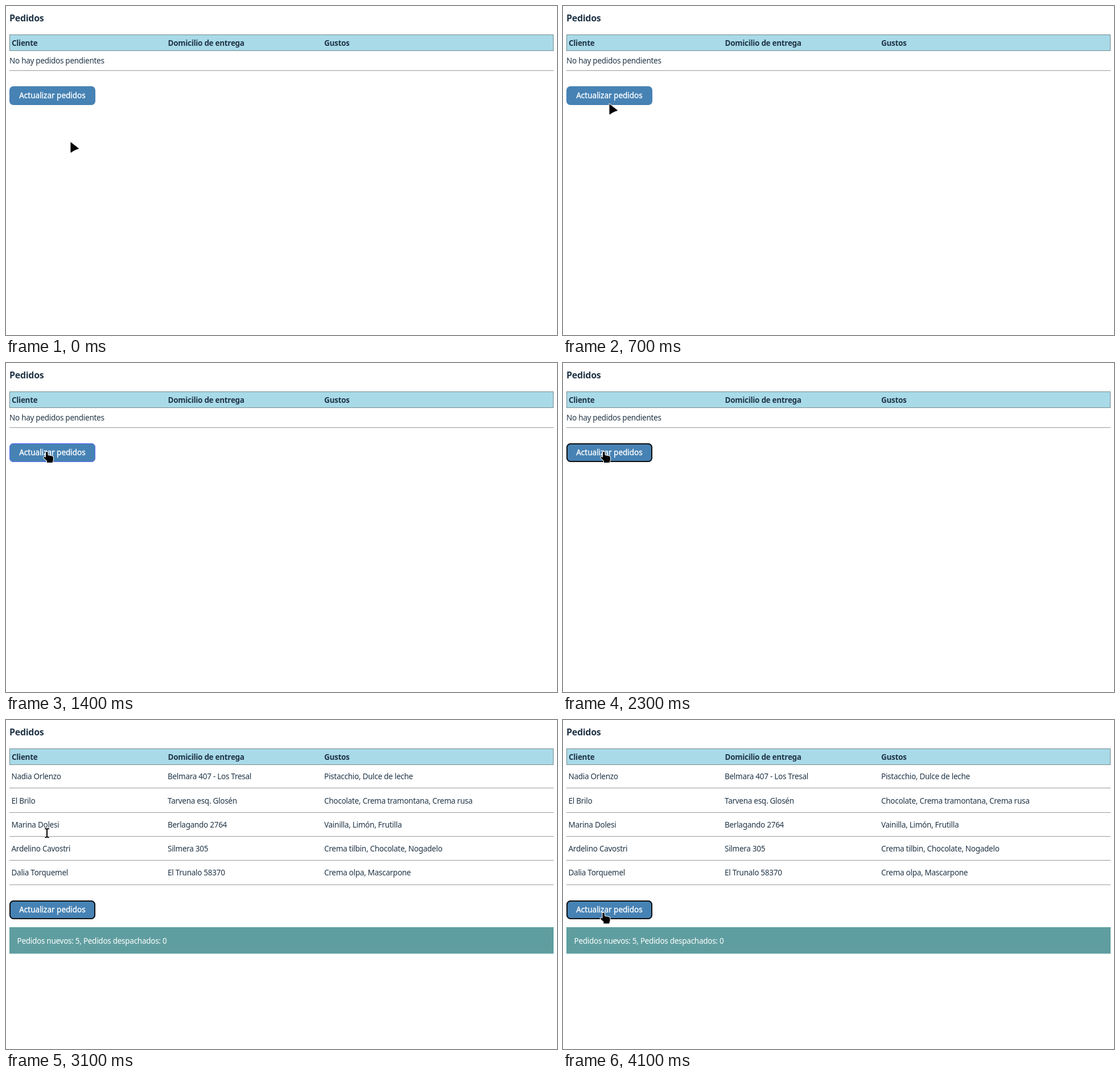
Write an HTML page that moves like this. It is 968x578 px and loops after 8 s.

```html
<!DOCTYPE html>
<html lang="es">
<head>
<meta charset="utf-8">
<title>Pedidos</title>
<style>
  html, body { margin: 0; width: 100%; height: 100%; overflow: hidden; background: #fff; }
  svg { display: block; }
  text { font: 13.5px "Noto Sans", "Open Sans", sans-serif; letter-spacing: -.27px; fill: #213547; }
  .bold { font-weight: 700; letter-spacing: -.3px; }
  .title { font-size: 16px; }
  .light { fill: #fff; }
  .label { text-anchor: middle; letter-spacing: 0; stroke: #fff; stroke-width: .35px; }
  .rule { stroke: #999; }
  #cursor { stroke: #fff; stroke-width: 2; stroke-linejoin: round; paint-order: stroke;
    filter: drop-shadow(0 .5px .5px #0006); }
</style>
</head>
<body>
<svg width="968" height="578" viewBox="0 0 968 578">
  <text class="bold title" x="6" y="27">Pedidos</text>
  <rect x="6.5" y="50.5" width="955" height="28" fill="#a8dae8" stroke="#7b8b90"/>
  <text class="bold" x="10" y="69.5">Cliente</text>
  <text class="bold" x="284.5" y="69.5">Domicilio de entrega</text>
  <text class="bold" x="559" y="69.5">Gustos</text>

  <g id="empty">
    <text x="6" y="101">No hay pedidos pendientes</text>
    <path class="rule" d="M6 113.5H962"/>
  </g>

  <g id="orders">
    <g id="rows"></g>
    <rect x="6" y="364" width="956" height="46.5" fill="#5f9ea0"/>
    <text class="light" x="19.5" y="392.5">Pedidos nuevos: 5, Pedidos despachados: 0</text>
  </g>

  <g id="button">
    <rect x="6" y="141" width="151" height="33" rx="7" fill="#4682b4"/>
    <rect id="ring" rx="6.5" fill="none"/>
    <text class="light label" x="81.5" y="162">Actualizar pedidos</text>
  </g>

  <path id="cursor"/>
</svg>
<script>
const $ = id => document.getElementById(id);
const set = (id, attrs) => {
  for (const name in attrs) $(id).setAttribute(name, attrs[name]);
};
const LOOP = 8000;

const orders = [
  ["Nadia Orlenzo", "Belmara 407 - Los Tresal", "Pistacchio, Dulce de leche"],
  ["El Brilo", "Tarvena esq. Glosén", "Chocolate, Crema tramontana, Crema rusa"],
  ["Marina Dolesi", "Berlagando 2764", "Vainilla, Limón, Frutilla"],
  ["Ardelino Cavostri", "Silmera 305", "Crema tilbin, Chocolate, Nogadelo"],
  ["Dalia Torquemel", "El Trunalo 58370", "Crema olpa, Mascarpone"]
];
const columns = [9.5, 284, 559];

$("rows").innerHTML = orders.map((order, i) => {
  const bottom = 119.9 + i * 42.3;
  const cells = order.map((cell, c) => `<text x="${columns[c]}" y="${bottom - 15.7}">${cell}</text>`).join("");
  return `${cells}<path class="rule" d="M6 ${Math.floor(bottom)}.5H962"/>`;
}).join("");

const shapes = {
  arrow: "M0 0L14 11V12Q7 13.5 1 18.5L0 18Z",
  hand: "M-2 1Q-.5 -1 1.5 1V6L9 7.5Q11 8 11 10V14L9.5 19H0V16L-5.5 11Q-6 8.5 -3.5 9L-2 10Z",
  beam: "M-3.5-8.5h2.5l1 1 1-1h2.5v2h-2.5v13h2.5v2h-2.5l-1-1-1 1h-2.5v-2h2.5v-13h-2.5z"
};

// Pointer steps: start time, shape, x, y
const pointer = [
  [0, "arrow", 113.5, 239],
  [500, "arrow", 107, 226],
  [600, "arrow", 93, 196],
  [700, "arrow", 81.5, 172],
  [800, "hand", 74, 164],
  [900, "hand", 72, 162],
  [1000, "hand", 71, 161],
  [1200, "hand", 71.5, 159],
  [1300, "hand", 72, 157],
  [1400, "hand", 72, 156],
  [2400, "arrow", 73.5, 156],
  [3100, "beam", 72, 198.5],
  [3200, "beam", 65, 254],
  [3300, "arrow", 58.5, 297],
  [3500, "arrow", 59, 305],
  [3600, "hand", 64, 322],
  [3700, "hand", 68, 339],
  [3800, "arrow", 70, 351],
  [3900, "hand", 72, 347],
  [4000, "hand", 72, 342],
  [4100, "hand", 71.5, 338.5]
];

function draw(now) {
  const t = now % LOOP;
  const loaded = t >= 2400, focused = t >= 2300, hovered = t >= 800;

  $("empty").style.display = loaded ? "none" : "";
  $("orders").style.display = loaded ? "" : "none";
  set("button", { transform: `translate(0 ${loaded ? 176 : 0})` });

  const line = focused ? 2 : 1;
  set("ring", {
    x: 6 + line / 2, y: 141 + line / 2, width: 151 - line, height: 33 - line,
    stroke: focused ? "#101010" : hovered ? "#646cff" : "none", "stroke-width": line
  });

  const [, shape, x, y] = pointer.findLast(([start]) => t >= start);
  set("cursor", { d: shapes[shape], transform: `translate(${x} ${y})` });
}

const begin = performance.now();
function tick() {
  draw(performance.now() - begin);
  requestAnimationFrame(tick);
}
tick();
</script>
</body>
</html>
```
